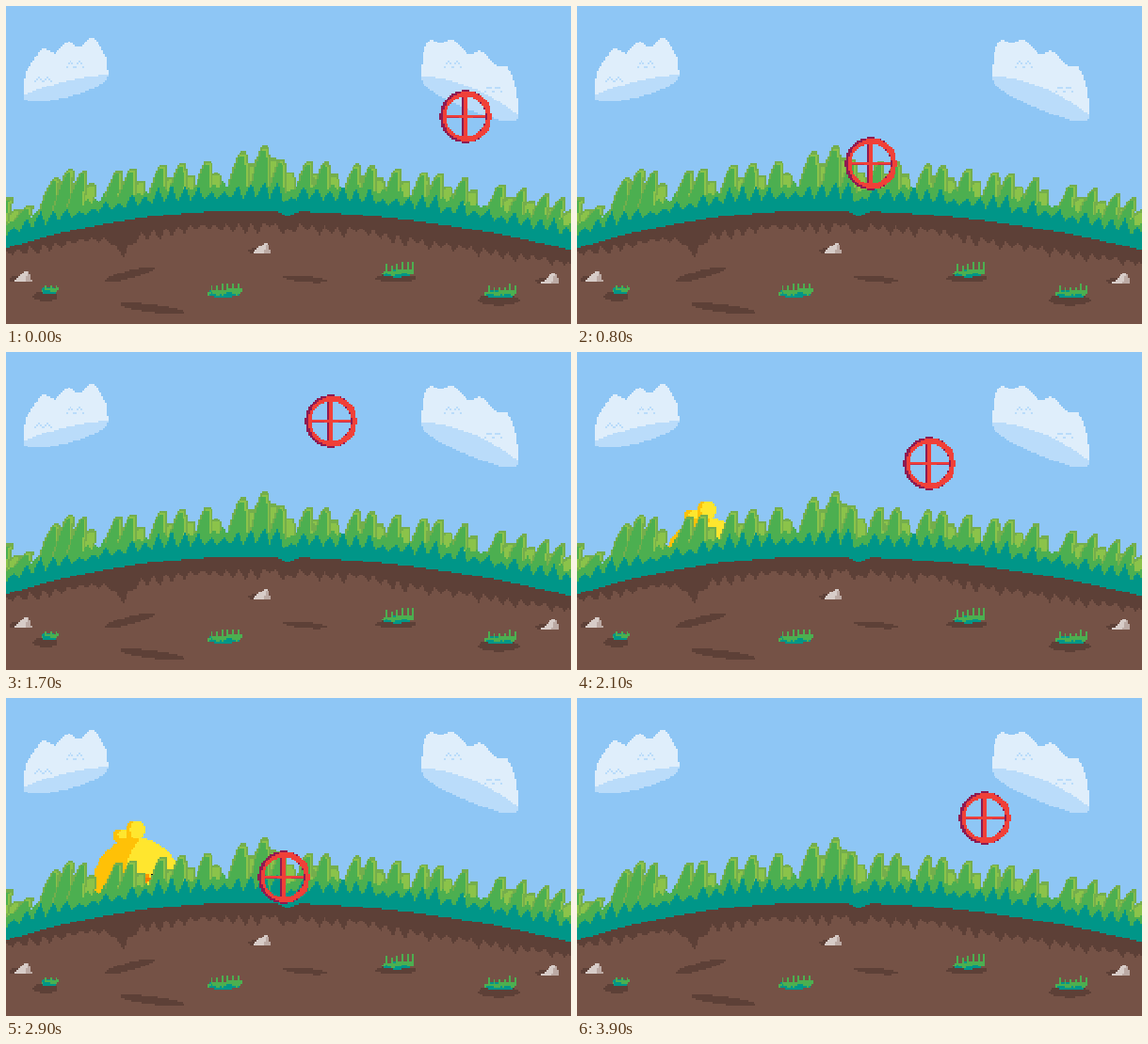
Recreate the animation shown at these times as an HTML page with a canvas. Size 600 by 338 pixels, loop 4 s.

```html
<!DOCTYPE html>
<html lang="en">
<head>
<meta charset="utf-8">
<title>Meadow target</title>
<style>
html, body { margin: 0; width: 100%; height: 100%; overflow: hidden; background: #8ec6f5; }
canvas { display: block; width: 600px; height: 338px; }
</style>
</head>
<body>
<canvas id="stage" width="600" height="338"></canvas>
<script>
const W = 320, H = 180, PX = 1.875, LOOP = 4000, STEP = 100;
const SKY = '#8ec6f5', CLOUD = '#dfeefb', SHADE = '#badcfa';
const EDGE = '#74ae4c', LIME = '#8bc34a', GREEN = '#4caf50', TEAL = '#009688';
const SOIL = '#755246', DARK = '#5d4037', STONE = '#d7ccc8', STONE_SHADE = '#bcaaa4';

const noise = n => {
  const s = Math.sin(n * 127.1 + 3.7) * 43758.5453;
  return s - Math.floor(s);
};
const bump = (x, centre, width) => Math.exp(-(((x - centre) / width) ** 2));

function layer(w, h, draw) {
  const c = document.createElement('canvas');
  c.width = w;
  c.height = h;
  draw(c.getContext('2d'));
  return c;
}

// Shapes are given in stage pixels and filled in whole art pixels.
function fillRow(g, y, x0, x1) {
  const a = Math.round(x0 / PX), b = Math.round(x1 / PX);
  if (b > a) g.fillRect(a, y, b - a, 1);
}

function fillColumn(g, x, y0, y1) {
  const a = Math.round(y0 / PX), b = Math.round(y1 / PX);
  if (b > a) g.fillRect(x, a, 1, b - a);
}

function block(g, color, x, y, w, h) {
  g.fillStyle = color;
  for (let r = Math.round(y / PX); r < Math.round((y + h) / PX); r++) fillRow(g, r, x, x + w);
}

// Calls span(stage x, half height 0..1) for every column across an ellipse
function eachColumn(cx, rx, span) {
  for (let x = 0; x < W; x++) {
    const sx = (x + 0.5) * PX, k = (sx - cx) / rx;
    if (Math.abs(k) < 1) span(x, sx, k);
  }
}

function oval(g, color, cx, cy, rx, ry, tilt = 0) {
  g.fillStyle = color;
  eachColumn(cx, rx, (x, sx, k) => {
    const y = cy + tilt * (sx - cx), h = ry * Math.sqrt(1 - k * k);
    fillColumn(g, x, y - h, y + h);
  });
}

function below(g, color, top) {
  g.fillStyle = color;
  for (let x = 0; x < W; x++) fillColumn(g, x, top((x + 0.5) * PX), H * PX);
}

// Puffy top above a tilted, bowed line; shaded belly below it
function cloud(g, c) {
  eachColumn(c.x, c.rx, (x, sx, k) => {
    const chord = c.y + c.tilt * (sx - c.x);
    const line = chord - c.bow * (1 - k * k);
    const puff = c.top + 4 * Math.cos(2 * Math.PI * (sx - c.crest) / (c.rx * 0.58));
    g.fillStyle = CLOUD;
    fillColumn(g, x, chord - puff * Math.sqrt(1 - k ** 6), line);
    g.fillStyle = SHADE;
    fillColumn(g, x, line, line + c.depth * Math.sqrt(1 - k * k));
  });
}

function curl(g, x, y) {
  g.fillStyle = SHADE;
  for (const hump of [0, 5])
    for (let k = -2; k <= 2; k++)
      g.fillRect(Math.round(x / PX) + hump + k, Math.round((y + k * k) / PX), 1, 1);
}

const sky = layer(W, H, g => {
  g.fillStyle = SKY;
  g.fillRect(0, 0, W, H);
  cloud(g, { x: 63, y: 84, rx: 45, tilt: -0.24, bow: 4, depth: 17, top: 41, crest: 65 });
  cloud(g, { x: 492.5, y: 95, rx: 51.5, tilt: 0.4, bow: 9, depth: 24, top: 48, crest: 505 });
  curl(g, 33, 75);
  curl(g, 67, 59);
  curl(g, 469, 59);
  curl(g, 511, 86);
});

const hill = x => 217 + (x < 260 ? 40 * ((260 - x) / 260) ** 2 : 42 * ((x - 260) / 340) ** 2)
  + 5 * bump(x, 299, 8);

// Saw teeth with a random size each, 0 between them
function teeth(x, period, min, extra) {
  const n = Math.floor(x / period), f = x / period - n;
  return (f < 0.6 ? f / 0.6 : (1 - f) / 0.4) * (min + extra * noise(n));
}

function blade(g, color, b, inset, drop) {
  g.fillStyle = color;
  const base = hill(b.x) - 8, top = b.y + drop;
  for (let y = Math.round(top / PX); y < base / PX; y++) {
    const u = Math.min(1, (base - (y + 0.5) * PX) / (base - b.y));
    if (u < 0) break;
    const c = b.x - b.lean * (1 - u ** 1.3);
    const hw = b.w * (1 - u) ** 0.5 + 1.8 - inset;
    fillRow(g, y, c - hw, c + hw);
  }
}

const tips = [4, 26, 54, 69, 83, 120, 135, 167, 188, 215, 252, 275, 293, 322, 340,
  373, 389, 416, 445, 461, 488, 527, 550, 575, 592];
const blades = tips.map(x => ({
  x,
  y: hill(x) - 54 - 16 * bump(x, 268, 20) - 13 * bump(x, 68, 18) + 16 * bump(x, 26, 12),
  lean: 6 + 10 * ((x - 300) / 300) ** 2,
  w: 10 + 3 * bump(x, 262, 20)
}));

function tuft(g, x, y, w, h) {
  oval(g, TEAL, x + w / 2, y - 4, w / 2, 4);
  g.fillStyle = GREEN;
  for (let i = 0; i < w / PX; i++) {
    const f = i * PX / w;
    const t = h * (0.3 + 0.25 * f + (i % 3 === 2 ? 0.25 + 0.3 * noise(i + x) : 0));
    fillColumn(g, Math.round(x / PX) + i, y - 1 - t, y - 2 - 3 * noise(i));
  }
}

function rock(g, x, y) {
  oval(g, DARK, x - 4, y + 3, 11, 3);
  for (let r = 0; r < 6; r++) {
    const row = Math.round(y / PX) - 3 + r, right = x + 6 + r * 0.7;
    g.fillStyle = STONE;
    fillRow(g, row, x + 1 - r * 2, right);
    g.fillStyle = STONE_SHADE;
    fillRow(g, row, x + 5 - r * 0.6, right);
  }
}

const meadow = layer(W, H, g => {
  // Each blade has a shorter, paler one behind its right side.
  for (const b of blades) {
    const back = { ...b, x: b.x + 9, y: b.y + 13 };
    blade(g, EDGE, back, 0, 0);
    blade(g, LIME, back, 2, 3);
  }
  for (const b of blades) {
    blade(g, EDGE, b, 0, 0);
    blade(g, LIME, b, 2, 3);
    blade(g, GREEN, { ...b, x: b.x - 1 }, 3, 4);
  }
  below(g, GREEN, x => hill(x) - 24 - teeth(x, 9, 2, 8));
  below(g, TEAL, x => hill(x) - 13 - teeth(x, 14, 6, 13));
  below(g, DARK, hill);
  below(g, SOIL, x => hill(x) + 13 - 9 * bump(x, 0, 70) + 16 * bump(x, 124, 14)
    + 6 * bump(x, 470, 70) + teeth(x, 13, 4, 9));

  oval(g, DARK, 131, 285, 26, 4.5, -0.25);
  oval(g, DARK, 155, 321, 34, 4, 0.12);
  oval(g, DARK, 318, 290, 23, 3, 0.08);
  oval(g, DARK, 42, 308, 13, 5);
  oval(g, DARK, 414, 289, 22, 4);
  oval(g, DARK, 523, 312, 22, 6);
  tuft(g, 37, 306, 17, 11);
  tuft(g, 213, 309, 36, 16);
  tuft(g, 400, 288, 32, 16);
  tuft(g, 508, 310, 33, 15);
  rock(g, 18, 287);
  rock(g, 272, 257);
  rock(g, 578, 289);
});

const chick = layer(W, H, g => {
  const gold = '#ffc107', yellow = '#ffe62e';
  oval(g, gold, 122, 129, 8, 8);
  oval(g, yellow, 124, 127, 5, 5);
  oval(g, gold, 137, 123, 10, 11);
  oval(g, yellow, 140, 122, 8, 10);
  oval(g, yellow, 139, 180, 47, 49);
  g.fillStyle = gold;
  for (let y = 70; y < 122; y++) {
    const sy = (y + 0.5) * PX, w = 47 * Math.sqrt(Math.max(0, 1 - ((sy - 180) / 49) ** 2));
    const split = 127 + 16 * (Math.max(0, 170 - sy) / 40) ** 2;
    fillRow(g, y, 139 - w, Math.min(split, 139 + w));
  }
  for (const x of [119, 157]) {
    block(g, '#111', x - 4, 168, 9, 6);
    block(g, '#111', x - 2, 166, 6, 10);
  }
  block(g, '#ff9800', 138, 169, 13, 4);
  block(g, '#f57c00', 136, 173, 17, 4);
  block(g, '#ff9800', 139, 177, 11, 3);
});

const SIGHT = 30;
const sight = layer(SIGHT, SIGHT, g => {
  const red = '#f04038', plum = '#8e1b52', rose = '#c72d4a', mid = SIGHT / 2;
  for (let y = 0; y < SIGHT; y++) for (let x = 0; x < SIGHT; x++) {
    const dx = x + 0.5 - mid, dy = y + 0.5 - mid, d = Math.hypot(dx, dy);
    let c = '';
    if (d < 12 && dx > -2 && dx < 1) c = dx < -1 ? plum : red;
    if (d < 12 && Math.abs(dy) < 1) c = Math.abs(dx) > 4 && dy > 0 ? rose : red;
    if (d > 11.2 && d < 14.6) {
      const lit = Math.hypot(dx - 1, dy);
      c = lit > 14 || lit < 10.7 ? plum : red;
    }
    g.fillStyle = c || 'transparent';
    g.fillRect(x, y, 1, 1);
  }
});

// time, x, y of the sight's centre; closes on itself
const path = [[0, 488, 117], [400, 368, 164], [1100, 294, 154], [1700, 345, 73], [1800, 353, 67],
  [2500, 379, 179], [3300, 210, 187], [3600, 270, 193], [3900, 433, 127]];

function knot(i) {
  const n = path.length, lap = Math.floor(i / n), [t, x, y] = path[i - lap * n];
  return [t + lap * LOOP, x, y];
}

// Smooth curve through the knots
function sightAt(t) {
  let i = 0;
  while (knot(i + 1)[0] <= t) i++;
  const [p, a, b, q] = [-1, 0, 1, 2].map(k => knot(i + k));
  const span = b[0] - a[0], u = (t - a[0]) / span, v = 1 - u;
  return [1, 2].map(k => {
    const ma = (b[k] - p[k]) / (b[0] - p[0]) * span;
    const mb = (q[k] - a[k]) / (q[0] - a[0]) * span;
    return v * v * ((1 + 2 * u) * a[k] + u * ma) + u * u * ((1 + 2 * v) * b[k] - v * mb);
  });
}

// Rises, waits, sinks back: 0 is fully up
const clamp = u => Math.min(1, Math.max(0, u));
const chickDrop = t => 84 * Math.max(1 - clamp((t - 1850) / 550), clamp((t - 2750) / 700));

const stage = document.getElementById('stage').getContext('2d');
stage.imageSmoothingEnabled = false;

const show = (img, x, y) =>
  stage.drawImage(img, Math.round(x), Math.round(y), img.width * PX, Math.ceil(img.height * PX));

function draw(now) {
  const t = Math.floor(now % LOOP / STEP) * STEP;
  const drop = chickDrop(t), [x, y] = sightAt(t), half = SIGHT * PX / 2;
  show(sky, 0, 0);
  if (drop < 84) show(chick, 0, drop);
  show(meadow, 0, 0);
  show(sight, x - half, y - half);
}

const start = performance.now();
function tick() {
  draw(performance.now() - start);
  requestAnimationFrame(tick);
}
tick();
</script>
</body>
</html>
```
